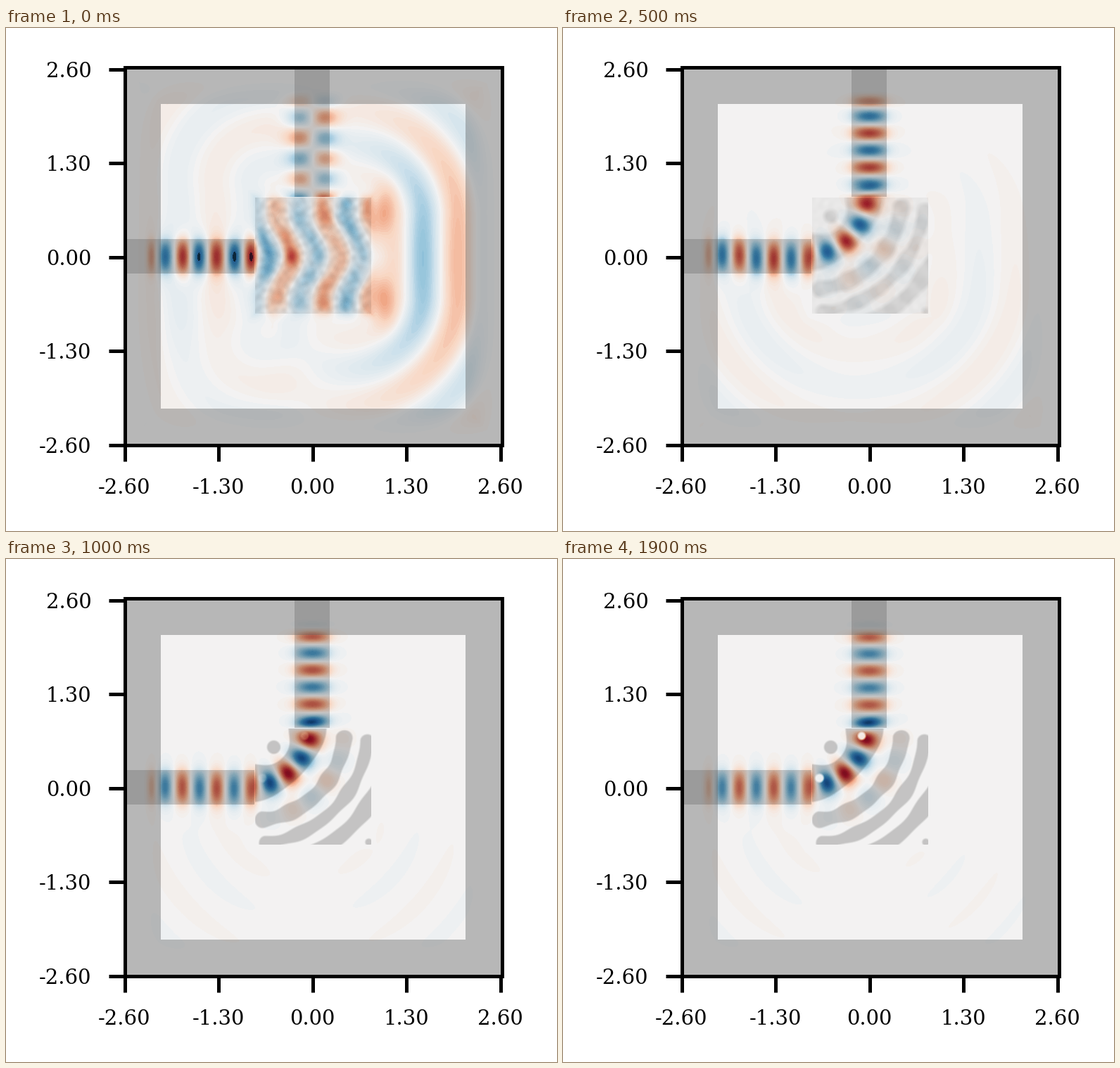
Animation of 783x715 px, one loop 2 s. Source, as a matplotlib script:

```python
import numpy as np
import matplotlib
import matplotlib.pyplot as plt
from matplotlib.animation import FuncAnimation
from matplotlib.patches import Rectangle

W, H, DPI = 783, 715, 100
FRAMES, STEP_MS = 20, 100
X0, X1, Y0, Y1 = 168, 705, 56, 594
BEND = (349, 239)      # centre of curvature of the bend
PORT = 24.5            # half width of a waveguide

X, Y = np.meshgrid(np.arange(X0, X1) + 0.0, np.arange(Y0, Y1) + 0.0)
rng = np.random.default_rng(4)

cmap = matplotlib.colormaps["RdBu_r"].copy()
cmap.set_over("#421426")
cmap.set_under("#0f3049")


def ramp(v, a, b):
    t = np.clip((v - a) / (b - a), 0, 1)
    return t * t * (3 - 2 * t)


def bump(v, mid, width):
    return np.exp(-((v - mid) / width) ** 2)


def sigmoid(v):
    return 1 / (1 + np.exp(-np.clip(v, -50, 50)))


def wave(d, peak, period):
    return np.cos(2 * np.pi * (d - peak) / period)


def blob(x, y, sx, sy):
    return bump(X, x, sx) * bump(Y, y, sy)


def mode(d):
    """Guided profile: cosine core with exponential tails."""
    a = np.abs(d)
    return np.where(a < PORT, np.cos(0.048 * a), 0.385 * np.exp(-0.115 * (a - PORT)))


def texture(count, lo, hi):
    out = np.zeros(X.shape)
    for _ in range(count):
        k = 2 * np.pi / rng.uniform(lo, hi)
        a, phase = rng.uniform(0, 2 * np.pi, 2)
        out += np.cos(k * (X * np.cos(a) + Y * np.sin(a)) + phase)
    return out / np.sqrt(count / 2)


# Regions
box_dist = np.maximum(np.abs(X - 436), np.abs(Y - 322.8)) - 82.8
in_box = box_dist < 0
outside = sigmoid(box_dist / 4)
guides = ((X < 353) & (Y >= 300) & (Y < 349)) | ((X >= 410) & (X < 460) & (Y < 240))
depth = np.maximum(np.abs(X - 436), np.abs(Y - 324)) - 216.5
border = depth > 0
absorb = bump(np.clip(depth, 0, None), 0, 24)

# Etched pattern: concentric arcs around the bend
rad = np.hypot(X - BEND[0], Y - BEND[1])
ang = np.degrees(np.arctan2(Y - BEND[1], X - BEND[0]))


def arc(radius, half_width, span):
    over = np.clip(np.abs(ang - 45) - span, 0, None)
    return np.hypot(rad - radius, np.radians(over) * radius) - half_width


def disc(x, y, r):
    return np.hypot(X - x, Y - y) - r


wavy = 2 * np.sin(np.radians(13 * ang)) + 1.2 * np.sin(np.radians(22 * ang) + 1)
core = arc(79, 18, 55) - 9 * np.abs(np.cos(np.radians(2 * ang))) ** 3
arcs = np.minimum.reduce([arc(132, 11, 38), arc(165, 9, 38), arc(199, 11, 30)]) - 0.6 * wavy
bands = np.minimum.reduce([core, arcs, disc(380, 267, 9.5), disc(515, 402, 5)])
holes = np.clip(0.5 - np.minimum(disc(364, 311, 6), disc(424, 251, 5.5)) / 3, 0, 1)
ripple = 0.5 + 0.5 * wave(X - Y, 85, 42)
grain = texture(40, 9, 18)
mottle = texture(24, 24, 45)

# Waves that miss the output port
dy = np.abs(Y - 324)
d_right = np.hypot(X - 489, np.clip(dy - 55, 0, None))
facing = bump(np.arctan2(dy * 0.8, X - 489), 0, 1.15) + 0.06
right = wave(d_right, 154, 102) * facing * outside
right *= ramp(d_right, 25, 100) * np.exp(-np.clip(d_right - 105, 0, None) / 200)
lobes = bump(dy, 60, 34) * bump(X, 534 - 0.1 * (60 - dy), 18) * ramp(X, 508, 524)
d_left = np.hypot(X - 379, np.clip(dy - 100, 0, None))
left = wave(d_left, 85, 104) * sigmoid((400 - X) / 18) * outside
stray = right + 0.9 * lobes + 0.2 * left

far = np.hypot(X - 420, Y - 340)
side = np.arctan2(Y - 340, X - 420)
rings = wave(far, 117, 106) * outside * (0.6 + 0.5 * np.sin(side - 0.2)) * (1 + 0.4 * np.sin(3 * side))

# Unpatterned square: chevron fronts, and an odd mode in the output guide
sweep = 24 * np.sin(np.pi / 2 * np.clip(dy / 62, 0, 1)) ** 2
strength = 0.3 + 0.12 * bump(dy, 65, 25) * ramp(X, 420, 450) + 0.28 * blob(384, 323, 32, 24)
chevron = wave(X + sweep, 474, 66) * (1 - outside) * strength * (1 + 0.12 * mottle)
off = (X - 435) / 18
leak = -0.36 * wave(Y, 156, 58) * off * np.exp(0.5 - off ** 2 / 2) * ramp(Y, 84, 114) * (Y < 240)
unguided = chevron + leak

# Weak light trapped in the outer arcs
ghosts = wave(ang, 35, 29.5) * bump(rad, 130, 17) * bump(ang, 42, 32)
ghosts_outer = wave(ang, 52, 27) * bump(rad, 168, 16) * bump(ang, 45, 35)


def field(n):
    start = float(n == 0)
    settle = ramp(n, 1, 12)
    level = 0.56 + 0.1 * bump(n, 6, 3.5)

    v = 0.36 * np.exp(-n / 1.8) * stray
    v += (0.012 + 0.03 * bump(n, 4, 3.5)) * rings
    v *= absorb

    tilt = 3.5 * bump(n, 6.5, 3.5) * np.tanh((X - 261) / 15)
    feed = wave(X, 250, 49) * mode(Y - 324.5 - tilt) * (1 - 0.12 * start * wave(X, 226, 73))
    v += (level + 0.16 * start) * feed * ramp(X, 194, 214) * sigmoid((357 - X) / 2.5)
    if start:
        return v + unguided

    drain = wave(Y, 145 + 13.5 * settle, 48.5) * mode(X - 435)
    v += level * drain * ramp(Y, 83, 113) * sigmoid((239 - Y) / 2.5)

    turn = wave(ang, 5.5 + 6.5 * settle, 44 - 4 * settle) * bump(rad, 83, 18)
    turn *= ramp(ang, -14, 4) * ramp(ang, 92, 78)
    v += (0.6 + 0.26 * ramp(n, 1, 8)) * turn
    v += (0.17 + 0.1 * np.exp(-n / 2)) * ghosts + 0.3 * np.exp(-n / 3) * ghosts_outer
    return v * (1 - 0.9 * ramp(n, 7, 16) * holes)


def density(n):
    grown = ramp(n, 0, 10)
    raw = 1 - grown
    shape = np.clip(0.5 - bands / (2.6 + 8 * raw), 0, 1)
    shape *= (1 - 0.6 * raw * ripple) * (1 - ramp(n, 7, 16) * holes)
    low = 0.45 * raw
    high = 0.45 + 0.55 * np.sqrt(grown)
    rho = low + (high - low) * shape + 0.08 * raw ** 2 * grain
    return np.where(in_box, np.clip(rho, 0, 1), guides)


def picture(n):
    v = field(n)
    hot = np.abs(v) > (0.73 if n == 0 else 1)
    v = np.clip(np.round(v * 40) / 40, -0.99, 0.99)
    v = np.where(hot, 3 * np.sign(v), v)
    rgb = cmap((v + 1) / 2)[..., :3] * 0.984
    rgb *= 1 - 0.192 * density(n)[..., None]
    rgb[border] = 0.6 * rgb[border] + 0.4 * 0.37
    return np.clip(rgb, 0, 1)


fig = plt.figure(figsize=(W / DPI, H / DPI), dpi=DPI, facecolor="white")
ax = fig.add_axes([0, 0, 1, 1])
ax.axis("off")
img = ax.imshow(picture(0), extent=(X0, X1, Y1, Y0), interpolation="nearest", aspect="auto")
ax.set_xlim(0, W)
ax.set_ylim(H, 0)

LINE = 5 * 72 / DPI
ax.add_patch(Rectangle((168.5, 56), 536, 537.3, fill=False, lw=LINE, ec="black", joinstyle="miter"))
tick = dict(color="black", lw=LINE, solid_capstyle="butt")
font = dict(family="DejaVu Serif", size=29 * 72 / DPI, color="black", va="baseline")
for i in range(5):
    label = f"{1.3 * (i - 2):.2f}"
    tx, ty = 168.5 + 133.6 * i, 593 - 133.6 * i
    ax.plot([tx, tx], [593, 615.5], **tick)
    ax.plot([145.5, 168.5], [ty, ty], **tick)
    ax.text(tx - 0.5, 661.5, label, ha="center", **font)
    ax.text(121.5, ty + 11, label, ha="right", **font)


def draw(n):
    img.set_data(picture(n))
    return (img,)


anim = FuncAnimation(fig, draw, frames=FRAMES, interval=STEP_MS, repeat=True, repeat_delay=0)
plt.show()
```
